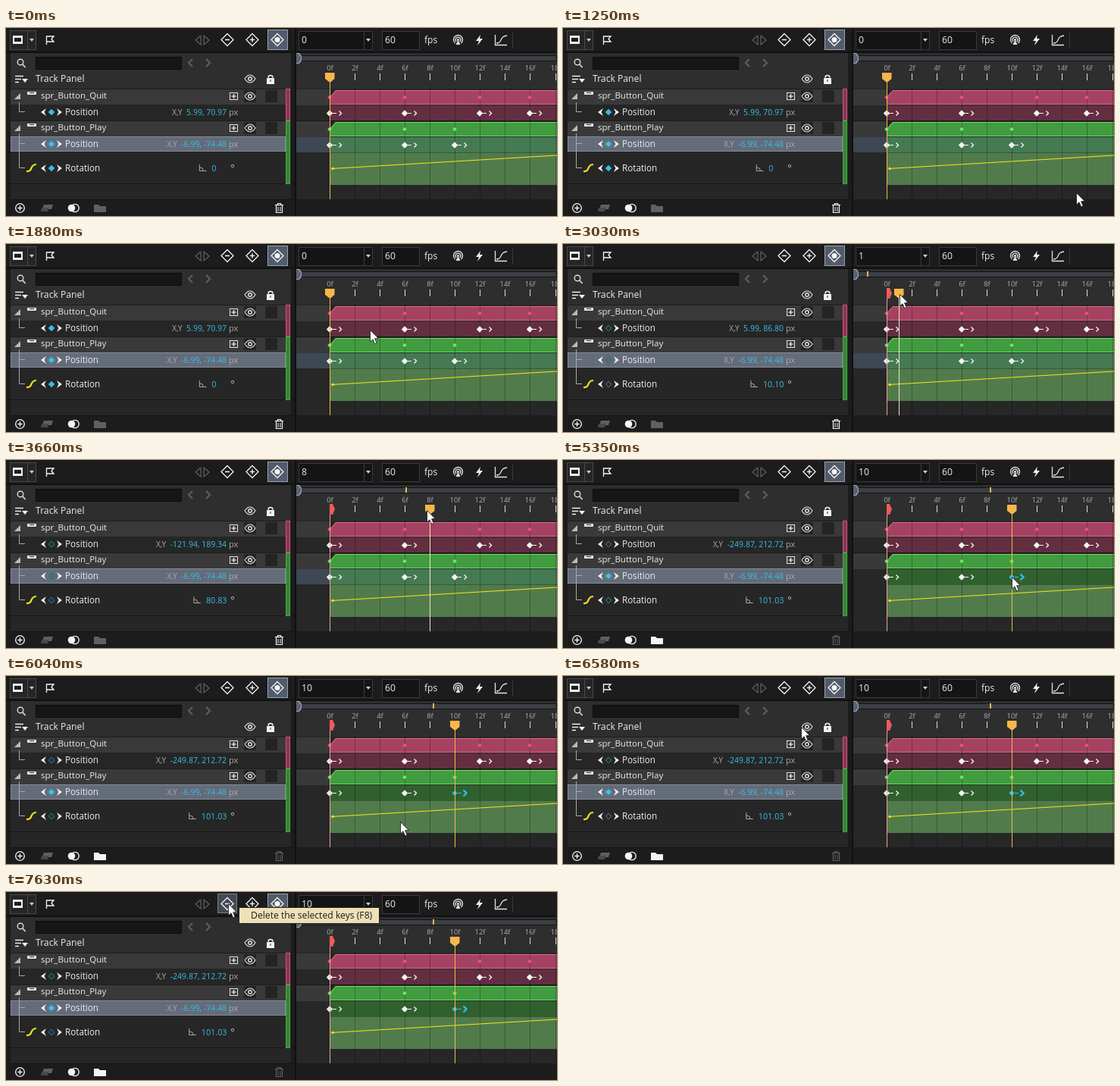
These frames come from a looping animation (727 by 248 pixels, 8000 ms). An HTML page with a canvas:

```html
<!DOCTYPE html>
<html lang="en">
<head>
<meta charset="utf-8">
<title>Sequence timeline</title>
<style>
html, body { margin: 0; width: 100%; height: 100%; overflow: hidden; background: #1b1b1b; }
canvas { display: block; }
</style>
</head>
<body>
<canvas id="stage" width="727" height="248"></canvas>
<script>
const g = document.getElementById('stage').getContext('2d');
const LOOP = 8000, REFRESH = 90, ZERO = 427, STEP = 16.56;
const DRAG = 3030, DROP = 4280, PICK = 5350, TIP = 7540;
const FONT = '"Open Sans", "Noto Sans", sans-serif';
const WHITE = '#f4f4f4', SOFT = '#e4e4e4', GREY = '#aaa', DIM = '#606060';
const CYAN = '#34bfe8', ORANGE = '#f6b64b', YELLOW = '#f5e616';
const QUIT_KEYS = [0, 6, 12, 16], PLAY_KEYS = [0, 6, 10];

// pointer moves: start, end, target x, y, ease-out power
const ENTRY = [677, 217];
const MOVES = [
  [1250, 1970, 460, 102, 1.15],
  [1970, 2660, 422, 66, 1.5],
  [2940, DROP, 593, 66, 1.94],
  [4650, 5070, 592, 154, 1.3],
  [5440, 5800, 391, 152, 1],
  [5800, 6040, 520, 192, 1],
  [6040, 6220, 627, 158, 1],
  [6220, 6310, 540, 151, 1],
  [6310, 6580, 314, 67, 1.2],
  [6580, 7170, 293, 15, 1.5]
];

function pointerAt(t) {
  if (t < MOVES[0][0]) return null;
  let [x, y] = ENTRY;
  for (const [start, end, toX, toY, power] of MOVES) {
    if (t < start) break;
    const seen = Math.floor((t - start) / REFRESH) * REFRESH;
    const k = t >= end ? 1 : seen / (end - start);
    const eased = 1 - (1 - k) ** power;
    x += (toX - x) * eased;
    y += (toY - y) * eased;
  }
  return [Math.round(x), Math.round(y)];
}
function frameAt(t, at) {
  if (t < DRAG) return 0;
  if (t >= DROP) return 10;
  return Math.min(10, Math.round((at[0] - ZERO) / STEP));
}
const frameX = f => Math.floor(ZERO + f * STEP);

function rect(c, x, y, w, h) { g.fillStyle = c; g.fillRect(x, y, w, h); }
function box(c, edge, x, y, w, h) { rect(edge, x, y, w, h); rect(c, x + 1, y + 1, w - 2, h - 2); }
function trace(pts, closed) {
  g.beginPath();
  for (let i = 0; i < pts.length; i += 2) g.lineTo(pts[i], pts[i + 1]);
  if (closed) g.closePath();
}
function fill(c, ...pts) { trace(pts, true); g.fillStyle = c; g.fill(); }
function line(c, w, ...pts) { trace(pts); g.strokeStyle = c; g.lineWidth = w; g.stroke(); }
function curve(c, w, x, y, ...bend) {
  g.beginPath(); g.moveTo(x, y); g.bezierCurveTo(...bend);
  g.strokeStyle = c; g.lineWidth = w; g.stroke();
}
function ring(c, w, x, y, r, a = 0, b = 7) {
  g.beginPath(); g.arc(x, y, r, a, b); g.strokeStyle = c; g.lineWidth = w; g.stroke();
}
function dot(c, x, y, r) { g.beginPath(); g.arc(x, y, r, 0, 7); g.fillStyle = c; g.fill(); }
function gem(c, x, y, r) { fill(c, x, y - r, x + r, y, x, y + r, x - r, y); }
function gemLine(c, w, x, y, r) {
  trace([x, y - r, x + r, y, x, y + r, x - r, y], true);
  g.strokeStyle = c; g.lineWidth = w; g.stroke();
}
function cross(c, x, y, r) { line(c, 1.4, x - r, y, x + r, y); line(c, 1.4, x, y - r, x, y + r); }
// side is -1 for left, 1 for right
function chevron(c, w, x, y, r, side) { line(c, w, x - side * r, y - r, x, y, x - side * r, y + r); }
function dart(x, y, side) { fill(WHITE, x, y - 5, x + side * 7, y, x, y + 5, x + side * 2.5, y); }
function drop(x, y) { fill('#ccc', x - 3, y, x + 3, y, x, y + 4); }
function text(s, x, y, size, c, align = 'left') {
  g.font = size + 'px ' + FONT;
  g.textAlign = align;
  g.fillStyle = c;
  g.fillText(s, x, y);
  return g.measureText(s).width;
}

function eye(x, y) {
  g.beginPath();
  g.moveTo(x - 7, y);
  g.quadraticCurveTo(x, y - 10, x + 7, y);
  g.quadraticCurveTo(x, y + 10, x - 7, y);
  g.strokeStyle = SOFT; g.lineWidth = 1.2; g.stroke();
  ring(SOFT, 1.4, x, y, 2.3);
}

function toolbar(hover) {
  box('#252525', '#4a4a4a', 5, 3, 35, 26);
  rect('#4a4a4a', 28, 4, 1, 24);
  rect(WHITE, 9, 10, 13, 11);
  rect('#1b1b1b', 11, 13, 9, 5);
  drop(34, 14);
  line(WHITE, 1.3, 53.5, 22, 53.5, 11, 63, 11, 60, 14.5, 63, 18, 54, 18);
  for (const s of [-1, 1]) {
    const x = 259 + 2 * s;
    line(DIM, 1.2, x, 10, x + 7 * s, 16, x, 22, x, 10);
  }
  if (hover) box('#434a55', '#77808d', 279, 2, 26, 26);
  box('#525b69', '#98a2b4', 345, 2, 27, 27);
  for (const x of [292, 325, 358]) gemLine(WHITE, 1.3, x, 15.5, 8);
  line(WHITE, 1.6, 289, 15.5, 295, 15.5);
  cross(WHITE, 325, 15.5, 3.2);
  dot(WHITE, 358, 15.5, 3.5);
}

function panelHead() {
  rect('#101010', 0, 31, 381, 2);
  rect('#262626', 6, 33, 370, 194);
  rect('#2e2e2e', 6, 33, 370, 47);
  ring('#ddd', 1.4, 19, 45, 3.8);
  line('#ddd', 1.6, 22, 48, 25.5, 52);
  box('#161616', '#0c0c0c', 39, 38, 193, 17);
  chevron(DIM, 2, 241, 46, 5, -1);
  chevron(DIM, 2, 269, 46, 5, 1);
  for (let i = 0; i < 3; i++) line(WHITE, 1.4, 12, 63.5 + 4 * i, 23 - 3 * i, 63.5 + 4 * i);
  fill(WHITE, 21, 67, 29, 67, 25, 72);
  text('Track Panel', 39, 71, 12.2, '#eee');
  eye(322, 67);
  rect(WHITE, 344, 66, 10, 8);
  ring(WHITE, 1.7, 349, 65.5, 3, Math.PI, 0);
  rect('#262626', 348.5, 68, 1, 3);
}

function spriteRow(name, y) {
  rect('#393939', 6, y, 363, 21);
  rect('#1d1d1d', 6, y, 363, 1);
  fill('#bbb', 19, y + 6, 19, y + 14, 11, y + 14);
  rect('#e2e2e2', 28, y + 4, 12, 4);
  rect('#333', 31, y + 5, 6, 1);
  text(name, 46, y + 13, 11.5, '#eee');
  g.strokeStyle = SOFT; g.lineWidth = 1;
  g.strokeRect(295.5, y + 5.5, 10, 9);
  cross(SOFT, 300.5, y + 10, 3);
  for (const x of [314, 342]) rect('#242424', x, y + 2, 16, 16);
  eye(322, y + 10);
}

function keyRow(name, y, on) {
  dart(53, y, -1);
  if (on) gem(CYAN, 60, y, 4.3);
  else gemLine('#286c82', 1.2, 60, y, 3.7);
  dart(67, y, 1);
  text(name, 78, y + 4, 11.7, '#eee');
}
function positionRow(y, on, x, v) {
  keyRow('Position', y, on);
  const w = text(x.toFixed(2) + ', ' + v.toFixed(2), 291, y + 4, 10.5, CYAN, 'right');
  text('X,Y', 285.5 - w, y + 4, 10, GREY, 'right');
  text('px', 294, y + 4, 11, GREY);
}
function rotationRow(f) {
  const right = f ? 291.5 : 277.5;
  keyRow('Rotation', 185, f === 0);
  const left = right - 16 - text(f ? (f * 10.1034).toFixed(2) : '0', right, 189, 10.8, CYAN, 'right');
  line(GREY, 1, left, 180, left, 188.5, left + 9, 188.5);
  line(GREY, 1, left, 184, left + 4, 185, left + 5, 188);
  ring(GREY, 1, 299, 182, 1.7);
  curve(YELLOW, 2.2, 27, 189, 36, 190, 31, 180, 40, 180);
}

function tracks(f) {
  const late = Math.max(0, f - 6);
  spriteRow('spr_Button_Quit', 80);
  spriteRow('spr_Button_Play', 122);
  box('#646c7a', '#858c98', 6, 143, 363, 20);
  positionRow(111, QUIT_KEYS.includes(f), 5.99 - 63.965 * late, 70.97 + 15.8317 * Math.min(f, 6) + 11.69 * late);
  positionRow(153, PLAY_KEYS.includes(f), -6.99, -74.48);
  rotationRow(f);
  line(GREY, 1, 17.5, 98, 17.5, 110.5, 25, 110.5);
  line(GREY, 1, 17.5, 139, 17.5, 184.5, 25, 184.5);
  line(GREY, 1, 17.5, 152.5, 25, 152.5);
  rect('#151515', 6, 205, 370, 1);
  box('#8d3553', '#c9527b', 369, 80, 6, 42);
  box('#338733', '#49a849', 369, 122, 6, 84);
}

function footer(picked) {
  const folder = picked ? WHITE : DIM, bin = picked ? DIM : WHITE;
  rect('#1c1c1c', 0, 227, 381, 21);
  rect('#121212', 6, 226, 370, 1);
  ring(WHITE, 1.3, 18.5, 237.5, 5.8);
  cross(WHITE, 18.5, 237.5, 3.2);
  fill(DIM, 50, 233, 62, 233, 60, 239, 48, 239);
  fill('#4a4a4a', 47, 237, 56, 237, 55, 242, 46, 242);
  ring(WHITE, 1.3, 91, 237.5, 5.2);
  dot(WHITE, 86.5, 237.5, 4.8);
  fill(folder, 116, 233, 122, 233, 124, 235, 132, 235, 132, 243, 116, 243);
  line(bin, 1.2, 355, 233.5, 366, 233.5);
  line(bin, 1.2, 358.5, 233, 358.5, 231.5, 362.5, 231.5, 362.5, 233);
  line(bin, 1.2, 356.5, 234, 356.5, 243.5, 364.5, 243.5, 364.5, 234);
  for (const x of [359, 362]) line(bin, 1, x, 236, x, 242);
}

function timelineTop(f) {
  rect('#101010', 381, 0, 2, 248);
  box('#141414', '#3a3a3a', 386, 4, 98, 25);
  rect('#3a3a3a', 472, 5, 1, 23);
  drop(478, 14);
  box('#141414', '#3a3a3a', 496, 4, 50, 25);
  text(f, 390, 20, 12.2, '#eee');
  text('60', 500, 20, 12.2, '#eee');
  text('fps', 552, 20, 12, '#eee');
  for (const r of [6, 3.4]) ring(SOFT, 1.3, 596.5, 15.5, r, 2.3, 7.13);
  dot(SOFT, 596.5, 15.5, 1.6);
  fill(SOFT, 596.5, 16, 599.5, 22, 593.5, 22);
  fill(WHITE, 626, 9, 620, 17, 624, 17, 622, 23, 629, 14, 625, 14);
  line(SOFT, 1.3, 645.5, 9, 645.5, 22.5, 661, 22.5);
  curve(SOFT, 1.3, 647, 20, 656, 20, 650, 11, 661, 10);
  rect('#3a3a3a', 668, 6, 1, 21);

  rect('#2e2e2e', 383, 32, 344, 48);
  rect('#101010', 383, 31, 344, 2);
  box('#3b3e44', '#141414', 383, 36, 344, 8);
  if (f) rect(ORANGE, 383 + f * 18, 36, 2, 7);
  fill('#9aa3b0', 383, 33, 387, 33, 390, 37, 390, 43, 387, 47, 383, 47);
  fill('#596373', 383, 34, 386, 34, 389, 38, 389, 42, 386, 46, 383, 46);
  for (let n = 0; n <= 18; n += 2) {
    text(n + 'f', frameX(n) + .5, 56, 9.5, GREY, 'center');
    rect('#ddd', frameX(n), 60, 1, 9);
  }
}

function bar(c, edge, y) {
  fill(edge, 427, y + 19, 427, y + 9, 435, y, 727, y, 727, y + 19);
  fill(c, 428, y + 18, 428, y + 9.5, 435.5, y + 1, 727, y + 1, 727, y + 18);
}
function key(n, y, sel) {
  const x = frameX(n), c = sel ? CYAN : WHITE;
  line(c, 1, x + 4, y + .5, x + 9, y + .5);
  gem(c, x, y + .5, sel ? 3.5 : 4.2);
  chevron(c, sel ? 2.4 : 1.4, x + 15.5, y + .5, sel ? 4 : 3, 1);
}

function lanes(picked) {
  rect('#272727', 383, 80, 344, 146);
  for (const y of [81, 123]) rect('#393939', 383, y, 44, 21);
  if (!picked) rect('#3d4853', 383, 144, 44, 20);
  rect('#632e40', 427, 102, 300, 21);
  rect(picked ? '#31602f' : '#457a53', 427, 144, 300, 21);
  rect('#527b4c', 427, 165, 300, 42);
  rect('#365b32', 427, 164, 300, 1);
  bar('#a44361', '#e0658d', 82);
  bar('#439b41', '#62e35f', 124);
  for (let n = 0; n <= 18; n += 2) rect('rgba(0,0,0,.27)', frameX(n), 80, 1, 146);
  rect('#171717', 383, 122, 344, 1);
  rect('#1c1c1c', 383, 226, 344, 22);
  for (const n of QUIT_KEYS) { gem('#f0507c', frameX(n), 91.5, 2.8); key(n, 112); }
  for (const n of PLAY_KEYS) { gem('#68ee62', frameX(n), 133.5, 2.8); key(n, 154, picked && n === 10); }
  line(YELLOW, 1.1, 430, 185.5, 727, 168);
  dot(YELLOW, 431, 185.5, 1.7);
}

function playhead(f) {
  const x = frameX(f), onKey = [...QUIT_KEYS, ...PLAY_KEYS].includes(f);
  if (f) {
    rect('#eda0a0', ZERO, 71, 1, 155);
    fill('#ef5b5b', 427, 58, 431, 58, 434, 65, 431, 72, 427, 72);
  }
  rect(onKey ? ORANGE : '#f0e4c4', x, 70, 1, 156);
  fill(ORANGE, x - 6, 59, x + 6.5, 59, x + 6.5, 67, x + .5, 72, x - 6, 67);
}

function tooltip(alpha) {
  g.globalAlpha = alpha;
  box('#eee1b9', '#2a2820', 307, 20, 186, 22);
  text('Delete the selected keys (F8)', 323, 35, 12.2, '#1c1c1c');
  g.globalAlpha = 1;
}

function pointer(x, y) {
  g.save();
  g.translate(x, y);
  trace([.5, .5, .5, 16, 4, 12.8, 6.6, 18.8, 9.2, 17.7, 6.6, 11.8, 11.3, 11.5], true);
  g.fillStyle = '#fff'; g.fill();
  g.strokeStyle = '#222'; g.lineWidth = .9; g.stroke();
  g.restore();
}

function draw(t) {
  const at = pointerAt(t), f = frameAt(t, at), picked = t >= PICK;
  const hover = at && at[0] >= 279 && at[0] < 305 && at[1] < 28;
  rect('#1c1c1c', 0, 0, 727, 248);
  toolbar(hover);
  panelHead();
  tracks(f);
  footer(picked);
  timelineTop(f);
  lanes(picked);
  playhead(f);
  if (t >= TIP) tooltip(t < TIP + REFRESH ? .5 : 1);
  if (at) pointer(...at);
}

const begin = performance.now();
function tick() {
  draw((performance.now() - begin) % LOOP);
  requestAnimationFrame(tick);
}
tick();
</script>
</body>
</html>
```
